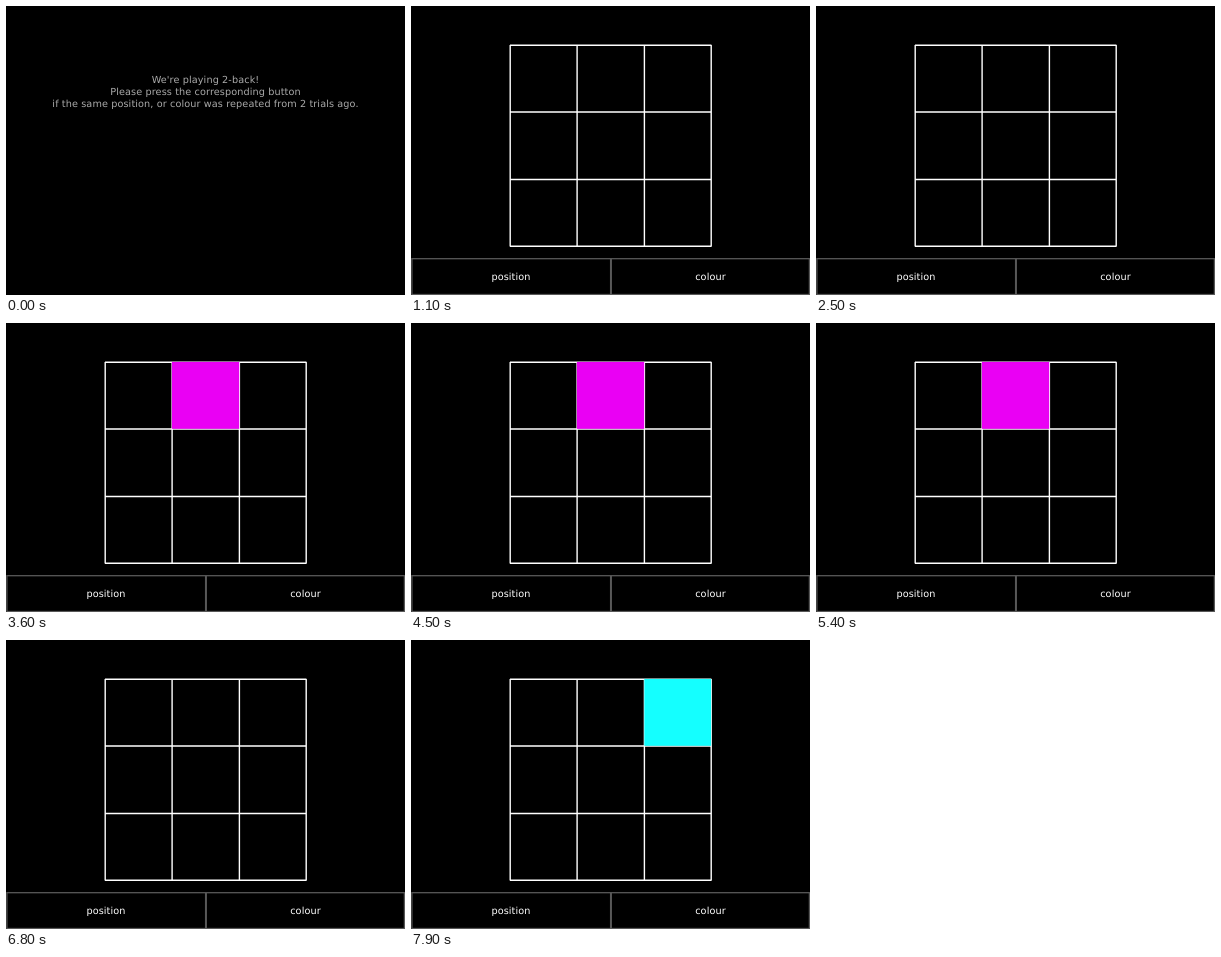
These frames come from a looping animation (399 px wide and 289 px high, 8000 ms). An HTML page:

```html
<!DOCTYPE html>
<html lang="en">
<head>
<meta charset="utf-8">
<title>2-back task</title>
<style>
  html, body { margin: 0; width: 100%; height: 100%; overflow: hidden; background: #000; }
  svg { display: block; width: 399px; height: 289px; }
  text {
    font: 9.7px "DejaVu Sans", sans-serif;
    letter-spacing: 0.1px;
    text-rendering: geometricPrecision;
    text-anchor: middle;
    fill: #fff;
  }
  .intro text { fill: #aaa; }
  .grid { fill: none; stroke: #fff; stroke-width: 1.4; }
  .buttons rect { fill: none; stroke: #585858; stroke-width: 1.3; }

  .intro, .task, .cell { animation: 8s step-end infinite; visibility: hidden; }
  .intro { animation-name: intro; }
  .task { animation-name: task; }
  .first { animation-name: first; fill: #ea00f4; }
  .second { animation-name: second; fill: #14ffff; }

  @keyframes intro { 0% { visibility: visible; } 7.5%, 100% { visibility: hidden; } }
  @keyframes task { 0% { visibility: hidden; } 7.5%, 100% { visibility: visible; } }
  @keyframes first {
    0% { visibility: hidden; }
    32.5% { visibility: visible; }
    70%, 100% { visibility: hidden; }
  }
  @keyframes second { 0% { visibility: hidden; } 95%, 100% { visibility: visible; } }
</style>
</head>
<body>
<svg viewBox="0 0 399 289">
  <g class="intro">
    <text x="199.5" y="77.2">We're playing 2-back!</text>
    <text x="199.5" y="89.2">Please press the corresponding button</text>
    <text x="199.5" y="101.2">if the same position, or colour was repeated from 2 trials ago.</text>
  </g>
  <g class="task">
    <path class="grid" d="M99 39.2h201.4M99 106h201.4M99 173.5h201.4M99 240.2h201.4
      M99.2 39v201.4M166.1 39v201.4M233.4 39v201.4M300.2 39v201.4"/>
    <g class="buttons">
      <rect x="0.9" y="252.7" width="198.7" height="35.8"/>
      <rect x="200.3" y="252.7" width="198.1" height="35.8"/>
    </g>
    <text x="100" y="274.2">position</text>
    <text x="299.5" y="274.2">colour</text>
  </g>
  <rect class="cell first" x="165.9" y="38.9" width="67.3" height="66.9"/>
  <rect class="cell second" x="233.3" y="38.9" width="66.8" height="66.9"/>
</svg>
</body>
</html>
```
